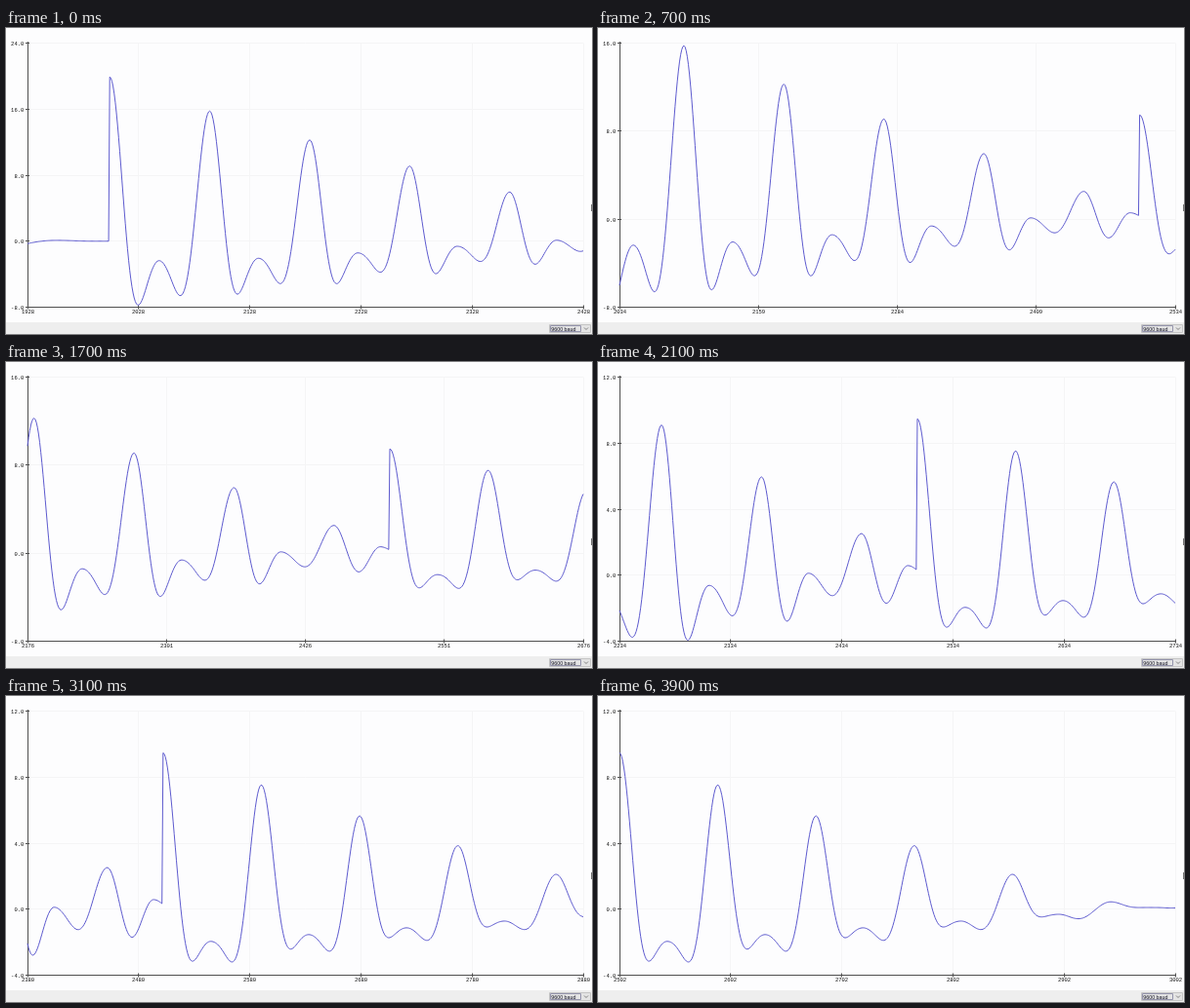
Animation, 600 px wide and 314 px high, one loop 4 s. Source, as an HTML page with a canvas:

```html
<!DOCTYPE html>
<html lang="en">
<head>
<meta charset="utf-8">
<title>Serial plotter</title>
<style>
  html, body { margin: 0; width: 100%; height: 100%; overflow: hidden; background: #fdfdfe; }
  canvas { display: block; }
</style>
</head>
<body>
<canvas id="stage" width="600" height="314"></canvas>
<script>
const ctx = document.getElementById('stage').getContext('2d');

const LOOP = 4000, STEP = 100, SPAN = 500;
const PLOT = { left: 22, right: 591, top: 15.5, bottom: 286.5 };
const TICK_STEPS = [1, 2, 4, 5, 8, 10];

// Key points of the scroll: [step index, first visible sample]
const SCROLL = [[0, 1928], [7, 2034], [13, 2117], [21, 2234], [27, 2323], [31, 2380], [39, 2502]];

const poly = (coefs, i) => coefs.reduceRight((sum, c) => sum * i + c, 0);

// A turning point that recurs each period; its level drifts as a polynomial.
const turn = (offset, period, ...level) => i => [offset + period * i, poly(level, i)];

// Each period of a burst runs crest, dip, bump, dip.
function burst(start, cycle) {
  const turns = [];
  for (let i = 0; i < 7; i++) turns.push(...cycle.map(at => at(i)));
  return { start, turns };
}

const BURSTS = [
  burst(2002, [
    turn(0, 89.95, 19.9, -4.556, 0.472, -0.0512),
    turn(25.6, 89.3, -7.75, 1.36, -0.03),
    turn(44.4, 89.4, -2.36, 0.038, 0.287, -0.0354),
    turn(63.5, 90, -6.6, 1.5, -0.04)
  ]),
  burst(2502, [
    turn(0, 88.4, 9.47, -1.98, 0.035),
    turn(26.5, 88.3, -3.15, 0.75, -0.02),
    turn(42.9, 88.1, -1.95, 0.41),
    turn(62, 87.7, -3.2, 0.655)
  ])
];

// Cubic in cos(phase): flat at both tops and at the dip between them.
function halfWave(n, [t0, top0], [tDip, dip], [t1, top1]) {
  const phase = t => Math.cos(Math.PI * (t - t0) / (t1 - t0));
  const u = phase(n), c = phase(tDip);
  const p = (top0 - dip) / (1 - c) ** 2;
  const q = (top1 - dip) / (1 + c) ** 2;
  return dip + (u - c) ** 2 * ((p + q) / 2 + (p - q) / 2 * u);
}

function quietTail(s) {
  if (s < 1954) return 0.1 - 0.4 * ((1954 - s) / 26) ** 2;
  return 0.05 + 0.05 * Math.cos(Math.PI * Math.min(1, (s - 1954) / 32));
}

function signal(s) {
  const current = BURSTS.filter(b => s >= b.start).pop();
  if (!current) return quietTail(s);
  const { start, turns } = current, n = s - start;
  let i = 0;
  while (n > turns[i + 2][0]) i += 2;
  return halfWave(n, turns[i], turns[i + 1], turns[i + 2]);
}

function firstSample(step) {
  let i = 0;
  while (i < SCROLL.length - 2 && step > SCROLL[i + 1][0]) i++;
  const [k0, s0] = SCROLL[i], [k1, s1] = SCROLL[i + 1];
  return Math.round(s0 + (s1 - s0) * (step - k0) / (k1 - k0));
}

// Smallest step that needs at most five ticks.
function fitAxis(min, max) {
  for (const step of TICK_STEPS) {
    const lo = Math.floor(min / step), hi = Math.ceil(max / step);
    if (hi - lo < 5) return { step, lo: lo * step, hi: hi * step, count: hi - lo + 1 };
  }
}

function line(x0, y0, x1, y1, color, width = 1) {
  ctx.strokeStyle = color;
  ctx.lineWidth = width;
  ctx.beginPath();
  ctx.moveTo(x0, y0);
  ctx.lineTo(x1, y1);
  ctx.stroke();
}

function label(text, x, y, align, font, color = '#111') {
  ctx.font = font;
  ctx.fillStyle = color;
  ctx.textAlign = align;
  ctx.textBaseline = 'alphabetic';
  ctx.fillText(text, x, y);
}

function drawAxes(axis, first, yOf) {
  const { left, right, top, bottom } = PLOT;
  const grid = '#f5f5f6', ink = '#505050', font = '5.5px "Liberation Mono", monospace';
  const snap = v => Math.floor(v) + 0.5;
  const xAt = i => snap(left + (right - left) * i / axis.count);
  const valueAt = i => axis.lo + i * axis.step;
  const yAt = i => snap(yOf(valueAt(i)));

  for (let i = 0; i < axis.count; i++) line(left, yAt(i), right, yAt(i), grid);
  for (let i = 1; i <= axis.count; i++) line(xAt(i), top, xAt(i), bottom, grid);

  line(left + 0.5, top - 1.5, left + 0.5, bottom + 1, ink);
  line(left, bottom, right + 1, bottom, ink);

  for (let i = 0; i < axis.count; i++) {
    line(left - 2, yAt(i), left + 2, yAt(i), ink);
    label(valueAt(i).toFixed(1), 18.3, yAt(i) + 2, 'right', font);
  }
  for (let i = 0; i <= axis.count; i++) {
    line(xAt(i), bottom - 2, xAt(i), bottom + 2, ink);
    label(String(first + SPAN * i / axis.count), xAt(i), 293, 'center', font);
  }
}

function drawTrace(values, yOf) {
  const { left, right } = PLOT;
  ctx.strokeStyle = '#5552cc';
  ctx.lineWidth = 0.95;
  ctx.lineJoin = 'round';
  ctx.beginPath();
  values.forEach((v, i) => ctx.lineTo(left + (right - left) * i / SPAN, yOf(v)));
  ctx.stroke();
}

function drawFooter() {
  ctx.fillStyle = '#eeeeee';
  ctx.fillRect(0, 302, 600, 12);
  ctx.fillStyle = '#e4e4e4';
  ctx.fillRect(557, 304, 41, 9);
  ctx.lineWidth = 1;
  ctx.strokeStyle = '#c4c4c4';
  ctx.strokeRect(556.5, 304.5, 42, 8);
  ctx.strokeStyle = '#9494ac';
  ctx.strokeRect(557.5, 305.5, 31, 6);
  label('9600 baud', 558.3, 310.6, 'left', '5.3px "Liberation Sans", sans-serif', '#111122');
  line(592, 307.5, 594, 309.5, '#666', 0.8);
  line(594, 309.5, 596, 307.5, '#666', 0.8);
  line(599.5, 181, 599.5, 188, '#777');
}

function draw(time) {
  const first = firstSample(Math.floor(time % LOOP / STEP));
  const values = Array.from({ length: SPAN + 1 }, (_, i) => signal(first + i));
  const axis = fitAxis(Math.min(...values), Math.max(...values));
  const yOf = v => PLOT.bottom - (PLOT.bottom - PLOT.top) * (v - axis.lo) / (axis.hi - axis.lo);

  ctx.fillStyle = '#fdfdfe';
  ctx.fillRect(0, 0, 600, 314);
  drawAxes(axis, first, yOf);
  drawTrace(values, yOf);
  drawFooter();
}

const began = performance.now();
function tick() {
  draw(performance.now() - began);
  requestAnimationFrame(tick);
}
tick();
</script>
</body>
</html>
```
